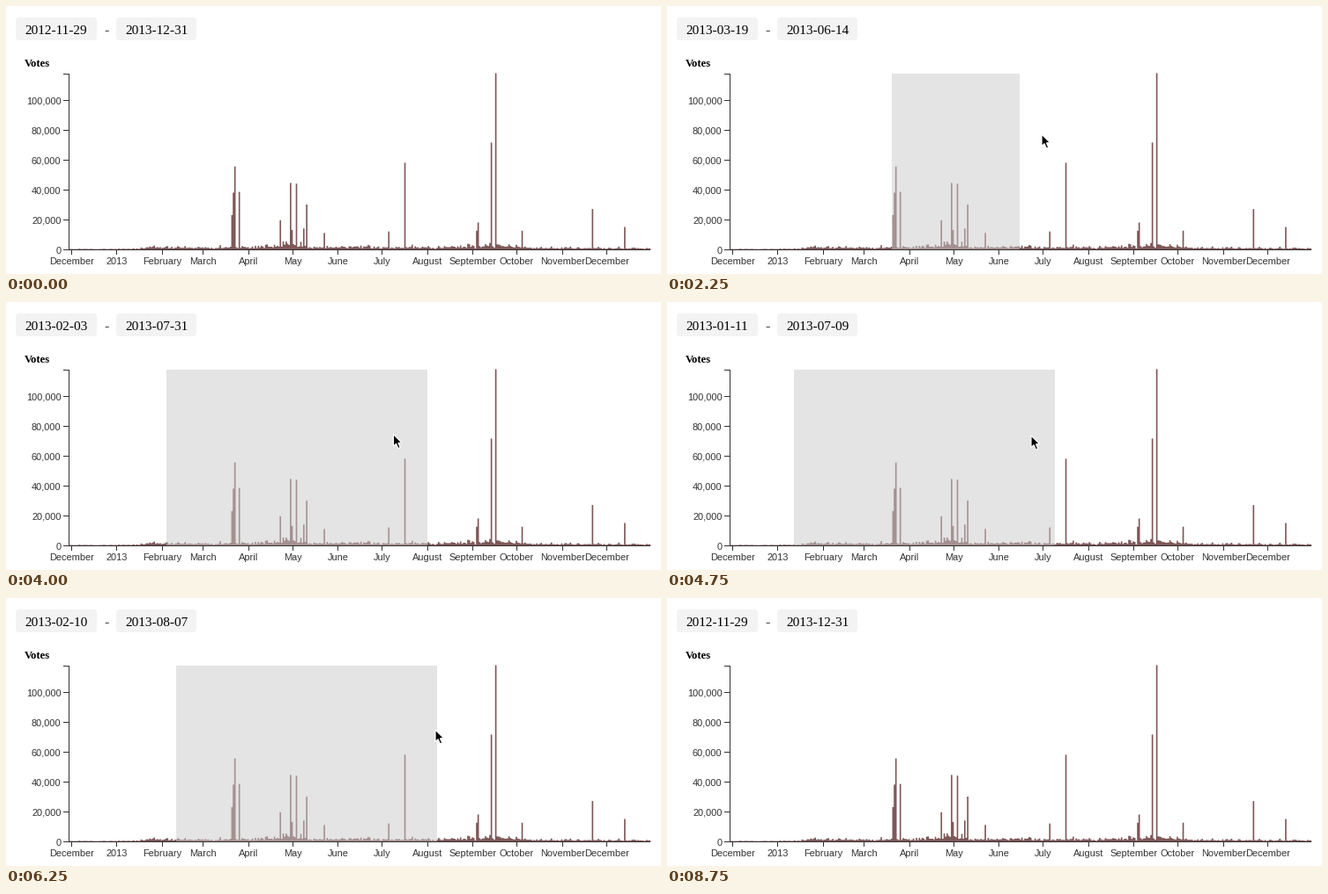
A matplotlib script for the animation above (9.75 s loop, 743 by 305 pixels).

```python
import numpy as np
import matplotlib.pyplot as plt
from matplotlib.animation import FuncAnimation
from matplotlib.patches import FancyBboxPatch, Polygon, Rectangle

W, H, DPI = 743, 305, 64
PX = 72 / DPI                      # points per pixel
FRAMES, STEP = 39, 250
X0, X1, TOP, BASE = 71, 731, 77, 277
DAYS = 397
DAY_W = (X1 - X0) / DAYS
VOTE_H = 1.7                       # pixels per thousand votes
START = np.datetime64("2012-11-29")
INK, BAR = "#333333", "#7f5858"
SANS, SERIF = "Liberation Sans", "Liberation Serif"

# Busiest days, in thousands of votes
PEAKS = {111: 23, 112: 38, 113: 55.5, 116: 38.5, 144: 19.5, 151: 44.5,
         152: 13, 155: 44, 160: 14, 162: 30, 174: 11, 218: 12, 229: 58,
         278: 12.5, 279: 18, 288: 71.5, 291: 118, 309: 12.5, 357: 27, 379: 15}

# Gesture stops: step, brush left, brush right, pointer x, pointer y
STOPS = np.array([
    (4, 255, 255, 254, 147),
    (8, 255, 335, 347, 146),
    (9, 255, 400, 425, 146),
    (12, 255, 551.1, 547, 148),
    (13, 255, 551.1, 512, 148),
    (18, 142, 438, 400, 152),
    (19, 144.05, 440.15, 413, 152),
    (22, 193, 489.1, 452, 151),
    (25, 193, 489.1, 487, 150),
    (29, 193, 593.3, 603, 152),
])


def pose(n):
    """Brush edges and pointer position, eased between stops."""
    n = np.clip(n, STOPS[0, 0], STOPS[-1, 0])
    i = min(np.searchsorted(STOPS[:, 0], n, "right"), len(STOPS) - 1)
    a, b = STOPS[i - 1], STOPS[i]
    t = (n - a[0]) / (b[0] - a[0])
    return (a + (b - a) * t * t * (3 - 2 * t))[1:]


def day_x(day):
    return X0 + day * DAY_W


def date_at(x):
    return str(START + int((x - X0) / DAY_W + 1e-6))


def votes():
    rng = np.random.default_rng(7)
    level = np.interp(np.arange(DAYS),
                      [0, 48, 55, 95, 140, 150, 165, 255, 290, 320, 396],
                      [.25, .4, 1.5, 1, 2, 4, 1.4, 1.4, 2.4, .9, .7])
    v = level * rng.lognormal(0, .4, DAYS)
    for day, count in PEAKS.items():
        v[day] = count
    return v


fig = plt.figure(figsize=(W / DPI, H / DPI), dpi=DPI, facecolor="white")
ax = fig.add_axes([0, 0, 1, 1])
ax.set(xlim=(0, W), ylim=(H, 0))
ax.axis("off")


def label(x, y, s, size, font=SANS, color=INK, ha="center", **kw):
    return ax.text(x, y, s, fontsize=size * PX, fontfamily=font, color=color,
                   ha=ha, va="baseline", zorder=5, **kw)


def line(xs, ys):
    ax.plot(xs, ys, color=INK, lw=PX, solid_capstyle="butt", snap=False,
            zorder=4)


def date_field(x, w):
    ax.add_patch(FancyBboxPatch((x, 13), w, 26, fc="#f3f3f3", ec="none",
                                boxstyle="round,pad=0,rounding_size=4"))
    return label(x + 10, 32.5, "", 15.2, SERIF, "black", "left")


from_text = date_field(11, 92)
to_text = date_field(125, 91)
label(114, 32.5, "-", 16, SERIF, "black")
label(21, 69, "Votes", 12.6, SERIF, "black", "left", fontweight="bold")

# Bars
ax.stairs(BASE - VOTE_H * votes(), day_x(np.arange(DAYS + 1)), baseline=BASE,
          fill=True, color=BAR, lw=0, snap=False, zorder=2)

# Axes
line([71.5, 71.5], [TOP, BASE + 1])
line([65, 72], [TOP + .5] * 2)
line([65, X1], [BASE + .5] * 2)
for k in range(0, 101, 20):
    y = BASE + .5 - VOTE_H * k
    line([65, 72], [y, y])
    label(62.5, y + 4, f"{k * 1000:,}", 11, ha="right")

MONTHS = ("December 2013 February March April May June July August "
          "September October November December").split()
for i, name in enumerate(MONTHS):
    first = (np.datetime64("2012-12") + i).astype("datetime64[D]")
    x = int(day_x((first - START).astype(int))) + .5
    line([x, x], [BASE, BASE + 6])
    label(x, 294, name, 11)

# Brush and pointer
brush = ax.add_patch(Rectangle((0, TOP), 0, BASE - TOP, fc="#cbcbcb",
                               alpha=.5, lw=0, zorder=3))
ARROW = np.array([(0, 0), (0, 13.5), (3.1, 10.7), (5.4, 16), (7.8, 15),
                  (5.5, 9.8), (9.6, 9.6)])
pointer = ax.add_patch(Polygon(ARROW, fc="black", ec="white", lw=1.2 * PX,
                               joinstyle="miter", zorder=8))


def draw(n):
    left, right, x, y = pose(n)
    brushing = 5 <= n < 32
    brush.set_x(round(left))
    brush.set_width(round(right) - round(left))
    brush.set_visible(brushing)
    if not brushing:
        left, right = X0, X1
    from_text.set_text(date_at(left))
    to_text.set_text(date_at(right))

    lift = 11 if n >= 34 else 0    # the pointer rises just before it leaves
    pointer.set_xy(ARROW + (x, y - lift))
    pointer.set_visible(4 <= n < 35)
    return brush, pointer, from_text, to_text


anim = FuncAnimation(fig, draw, frames=FRAMES, interval=STEP, repeat=True,
                     repeat_delay=0, init_func=lambda: draw(0))
plt.show()
```
